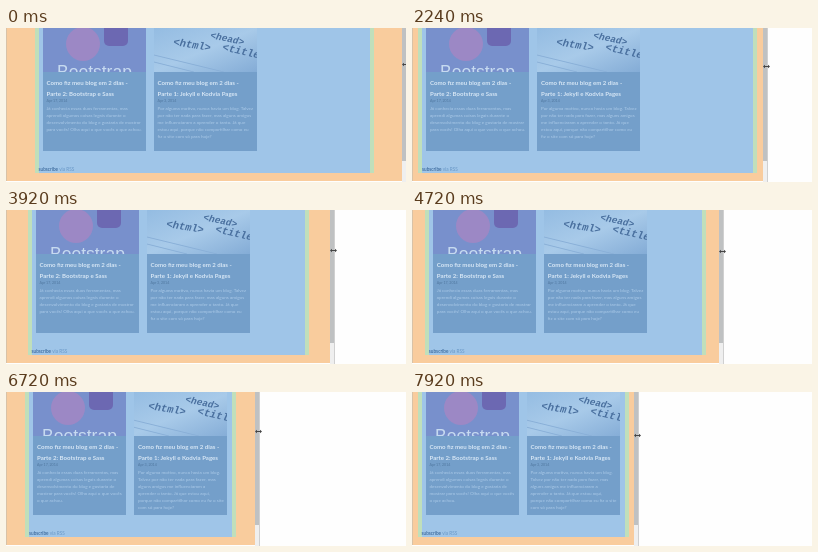
These frames come from a looping animation (400x154 px, 8 s). An HTML page:

```html
<!DOCTYPE html>
<html lang="pt-BR">
<head>
<meta charset="utf-8">
<title>Responsive blog</title>
<style>
  html, body { margin: 0; width: 100%; height: 100%; overflow: hidden; background: #fefefe; }
  #stage { position: relative; width: 400px; height: 154px; overflow: hidden; background: #fefefe; }
  #stage div, #stage svg { position: absolute; }
  #page { left: 0; top: 0; height: 153px; background: #f9cc9d; overflow: hidden; border-left: 1px solid #d9c2a6; box-sizing: border-box; }
  #box { top: 0; height: 145px; box-sizing: content-box; background: #9fc5e8; border: solid #c0dfbb; border-width: 0 4.5px; }
  .card { top: 0; height: 123px; background: #749fca; overflow: hidden; }
  .card svg { left: 0; bottom: 79px; width: 100%; height: 44px; }
  .card h2, .card p, .card small { position: absolute; left: 4px; margin: 0; }
  h2 { top: 50px; font: bold 6.1px/10.5px Lato, sans-serif; color: #d6e6f5; white-space: nowrap; }
  small { top: 71px; font: 3.6px/4px Lato, sans-serif; color: #50779f; }
  .card p { top: 76.5px; right: 3px; font: 4.6px/7.1px Lato, sans-serif; color: #abcae8; }
  #feed { left: 0; top: 138px; font: 4.7px/6px Lato, sans-serif; color: #6796c5; white-space: nowrap; }
  #feed b { color: #315f93; font-weight: 500; }
  #bar { top: 0; width: 5px; height: 154px; background: #efefef; border-right: 1px solid #d0d0d0; box-sizing: border-box; }
  #bar div { left: 0; top: 0; width: 4px; height: 133px; background: #bfc1c2; }
  #cursor { width: 7px; height: 5px; }
</style>
</head>
<body>
<div id="stage">
  <div id="page">
    <div id="box">
      <div class="card">
        <svg viewBox="0 0 103 44" preserveAspectRatio="xMidYMax slice">
          <rect width="103" height="44" fill="#7890cc"/>
          <circle cx="40" cy="16" r="17" fill="#9c88c5"/>
          <rect x="61" y="-8" width="24" height="26" rx="5" fill="#6c68b2"/>
          <text x="14" y="50" font-family="Liberation Sans, sans-serif" font-size="17.5" fill="#c6daf0">Bootstrap</text>
        </svg>
        <h2>Como fiz meu blog em 2 dias -<br>Parte 2: Bootstrap e Sass</h2>
        <small>Apr 17, 2014</small>
        <p>Já conhecia essas duas ferramentas, mas aprendi algumas coisas legais durante o desenvolvimento do blog e gostaria de mostrar para vocês! Olha aqui o que vocês o que achou.</p>
      </div>
      <div class="card">
        <svg viewBox="0 0 103 44" preserveAspectRatio="xMidYMax slice">
          <defs>
            <linearGradient id="paper" x2="1" y2="1">
              <stop offset="0" stop-color="#94bce2"/>
              <stop offset=".5" stop-color="#a8cae9"/>
              <stop offset="1" stop-color="#84acd6"/>
            </linearGradient>
          </defs>
          <rect width="103" height="44" fill="url(#paper)"/>
          <g font-family="Liberation Mono, monospace" font-weight="bold" font-style="italic" font-size="10.5" fill="#496f9e">
            <text transform="translate(19 17) rotate(9)">&lt;html&gt;</text>
            <text transform="translate(56 10) rotate(12)" font-size="9.5">&lt;head&gt;</text>
            <text transform="translate(68 22) rotate(13)">&lt;title&gt;</text>
          </g>
          <path d="M0 27L70 44M0 34L40 44" stroke="#8ab0d8" fill="none"/>
        </svg>
        <h2>Como fiz meu blog em 2 dias -<br>Parte 1: Jekyll e Kodvia Pages</h2>
        <small>Apr 3, 2014</small>
        <p>Por alguma motivo, nunca havia um blog. Talvez por não ter nada para fazer, mas alguns amigos me influenciaram a aprender o tanto. Já que estou aqui, porque não compartilhar como eu fiz o site com só para hoje?</p>
      </div>
      <div id="feed"><b>subscribe</b> via RSS</div>
    </div>
  </div>
  <div id="bar"><div></div></div>
  <svg id="cursor" viewBox="0 0 7 5"><path d="M0 2.5L2 .8V4.2ZM7 2.5L5 .8V4.2ZM2 2.1H5V2.9H2Z" fill="#444"/></svg>
</div>
<script>
  const LOOP = 8000, STEP = 80, PAD = 4.5;
  // time, viewport width, cursor height
  const drag = [
    [0, 396, 36], [320, 396, 36], [1120, 380, 36], [1200, 377, 36], [2000, 356, 38],
    [2240, 351, 38], [2880, 345, 39], [3360, 345, 39], [3920, 324, 40], [4160, 320, 40],
    [5040, 299, 41], [5440, 286, 42], [6080, 281, 42], [6720, 249, 39], [6960, 243, 40],
    [7840, 223, 43], [7920, 222, 43]
  ];
  // smallest viewport, content width, column width
  const layouts = [[347, 331, 111], [288, 273, 111], [0, 203, 101]];

  const $ = id => document.getElementById(id);
  const page = $('page'), box = $('box'), bar = $('bar'), cursor = $('cursor');
  const cards = document.querySelectorAll('.card');
  const px = n => n + 'px';

  function sample(t) {
    const i = drag.findIndex(k => k[0] >= t);
    if (i <= 0) return drag[0].slice(1);
    const a = drag[i - 1], b = drag[i];
    const p = (t - a[0]) / (b[0] - a[0]);
    return [1, 2].map(n => a[n] + (b[n] - a[n]) * p);
  }

  function draw(now) {
    const t = Math.floor(now % LOOP / STEP) * STEP;
    const [view, y] = sample(t);
    const [, width, column] = layouts.find(l => view >= l[0]);
    page.style.width = px(view);
    box.style.width = px(width);
    box.style.left = px((view - 1 - width) / 2 - PAD);
    cards.forEach((card, i) => {
      card.style.left = px(4 + i * column);
      card.style.width = px(column - 8);
    });
    bar.style.left = px(view);
    cursor.style.left = px(view);
    cursor.style.top = px(y - 2);
  }

  const start = performance.now();
  function tick() {
    draw(performance.now() - start);
    requestAnimationFrame(tick);
  }
  tick();
</script>
</body>
</html>
```
